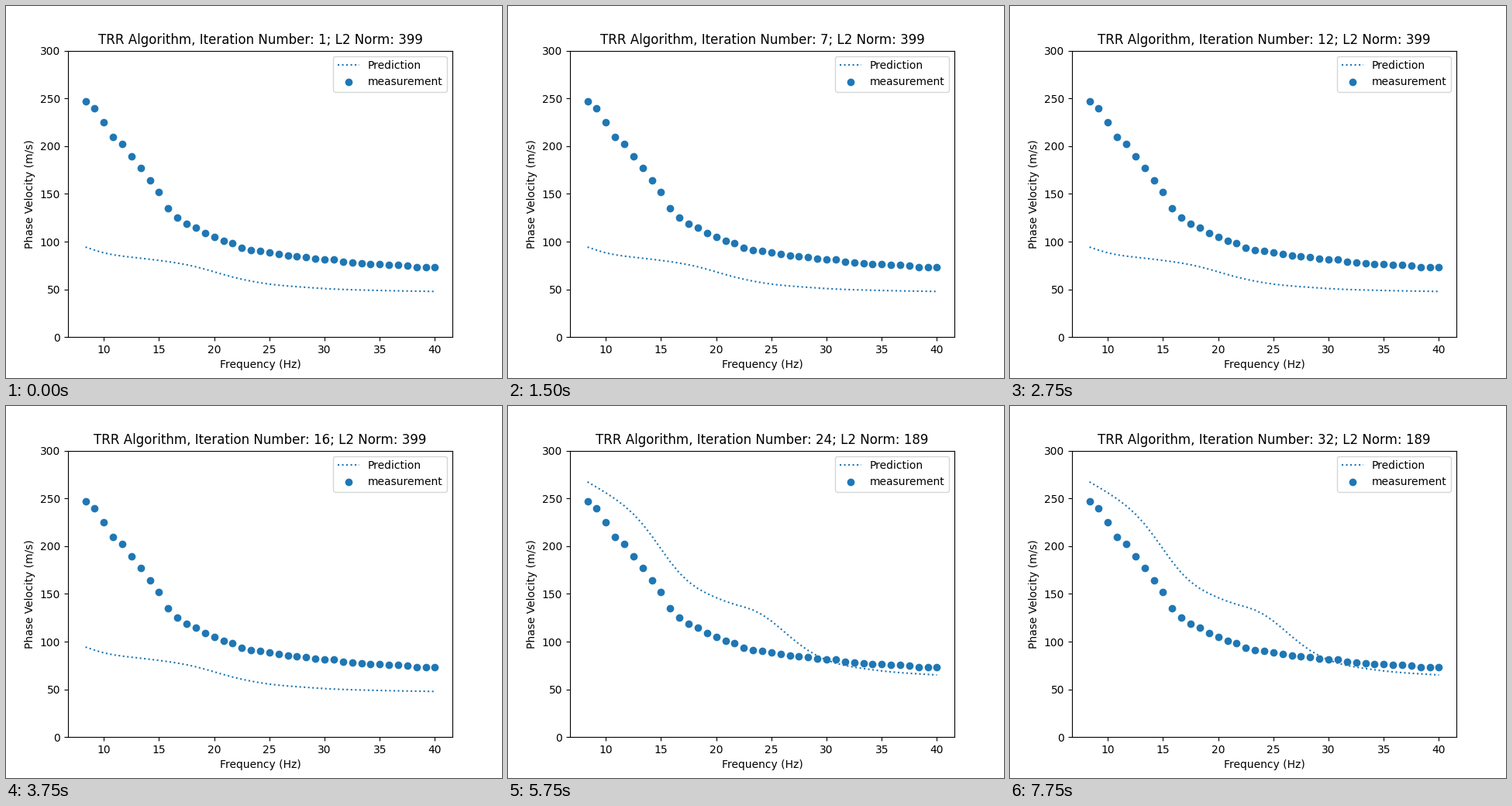
Recreate the animation shown at these times as a matplotlib script. Size 640 px wide and 480 px high, loop 8000 ms.

```python
import matplotlib.pyplot as plt
import numpy as np
from matplotlib.animation import FuncAnimation

FRAMES = 32
INTERVAL = 250
STEP_ITERATION = 17  # first iteration that uses the updated model
BLUE = "#1f77b4"

freq = np.linspace(25 / 3, 40, 39)

measured = [
    247, 239.6, 225, 209.6, 202, 189, 177, 164, 152, 135, 125, 118.7, 114.6,
    109, 105, 101, 98.5, 93.5, 91, 90, 88.5, 87, 85.5, 84.5, 84, 82, 81.3,
    81.3, 79, 78, 77.3, 76.5, 76.4, 75.7, 75.5, 75, 73.3, 73.2, 73,
]

# Every second sample of the predicted curves
initial_knots = [
    94.3, 88.2, 84.8, 82.6, 80.3, 77.5, 73.6, 68.3, 62.9, 58.6,
    55.5, 53.5, 52.1, 50.8, 49.9, 49.3, 48.8, 48.4, 48.1, 47.8,
]
updated_knots = [
    267.3, 255.8, 242.2, 223, 197, 171.8, 155.6, 146, 139, 133.1,
    121.5, 105.3, 90.7, 80.7, 75, 71.8, 69.3, 67.5, 66.2, 65.1,
]


def spline(knots):
    """Natural cubic spline through equally spaced knots, sampled at freq."""
    y = np.array(knots, float)
    n = len(y)
    system = 4 * np.eye(n) + np.eye(n, k=1) + np.eye(n, k=-1)
    system[0], system[-1] = np.eye(n)[0], np.eye(n)[-1]
    rhs = np.zeros(n)
    rhs[1:-1] = 6 * np.diff(y, 2)
    bend = np.linalg.solve(system, rhs)
    u = np.linspace(0, n - 1, len(freq))
    i = np.minimum(u.astype(int), n - 2)
    b = u - i
    a = 1 - b
    return (a * y[i] + b * y[i + 1]
            + ((a**3 - a) * bend[i] + (b**3 - b) * bend[i + 1]) / 6)


initial = spline(initial_knots)
updated = spline(updated_knots)

fig, ax = plt.subplots(figsize=(6.4, 4.8), dpi=100)
line, = ax.plot(freq, initial, ":", color=BLUE, label="Prediction")
ax.scatter(freq, measured, color=BLUE, label="measurement")
margin = 0.05 * (freq[-1] - freq[0])
ax.set_xlim(freq[0] - margin, freq[-1] + margin)
ax.set_ylim(0, 300)
ax.set_xlabel("Frequency (Hz)")
ax.set_ylabel("Phase Velocity (m/s)")
ax.legend(loc="upper right")
title = ax.set_title("")


def update(frame):
    iteration = frame + 1
    stepped = iteration >= STEP_ITERATION
    norm = 189 if stepped else 399
    line.set_ydata(updated if stepped else initial)
    title.set_text(
        f"TRR Algorithm, Iteration Number: {iteration}; L2 Norm: {norm}")
    return line, title


anim = FuncAnimation(fig, update, frames=FRAMES, interval=INTERVAL,
                     repeat=True, repeat_delay=0, blit=False)
plt.show()
```
